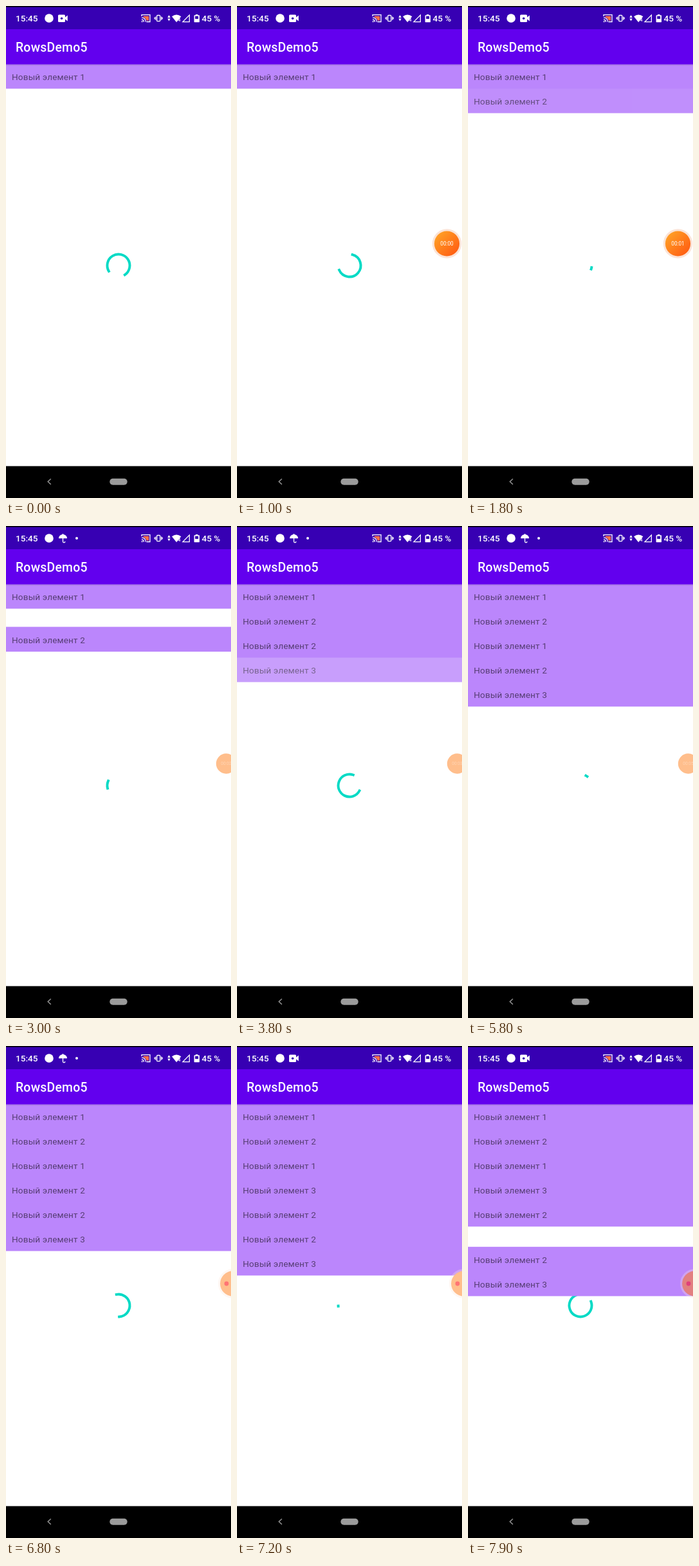
Recreate the animation shown at these times as an HTML page. Size 350 by 764 pixels, loop 8000 ms.

```html
<!DOCTYPE html>
<html lang="ru">
<head>
<meta charset="utf-8">
<title>RowsDemo5</title>
<style>
  html, body { margin: 0; width: 100%; height: 100%; overflow: hidden; background: #fff; }
  svg { display: block; width: 350px; height: 764px; font-family: Roboto, "Noto Sans", sans-serif; }
  .status { font-size: 13.6px; font-weight: 500; fill: #fff; }
  .title { font-size: 19.4px; font-weight: 500; letter-spacing: .0125em; fill: #fff; }
  .row rect { fill: #bb86fc; }
  .row text { font-size: 13.6px; letter-spacing: .01em; fill: #000; fill-opacity: .54; }
  .timer { font-size: 8.2px; fill: #fff; text-anchor: middle; }
  .line { fill: none; stroke: #fff; stroke-width: 1.3; }
</style>
</head>
<body>
<svg viewBox="0 0 350 764">
  <defs>
    <linearGradient id="orange" x1="0" y1="0" x2="1" y2="1">
      <stop offset=".1" stop-color="#ffa126"/><stop offset=".9" stop-color="#ff5c12"/>
    </linearGradient>
    <linearGradient id="shade" x1="0" y1="0" x2="0" y2="1">
      <stop offset="0" stop-color="#000" stop-opacity=".14"/><stop offset="1" stop-color="#000" stop-opacity="0"/>
    </linearGradient>
  </defs>
  <rect width="350" height="764" fill="#fff"/>
  <path id="arc" fill="none" stroke="#03dac5" stroke-width="3.9" stroke-linecap="square"/>
  <g id="rows"></g>

  <rect y="90.5" width="350" height="3" fill="url(#shade)"/>
  <rect y="36" width="350" height="54.6" fill="#6200ee"/>
  <rect width="350" height="36" fill="#3700b3"/>
  <rect width="350" height="1.6" fill="#000"/>
  <text class="title" x="15" y="71">RowsDemo5</text>

  <g class="status">
    <text x="15" y="24">15:45</text>
    <circle cx="67" cy="19" r="6.8"/>
    <g id="camera">
      <path d="M82.5 13.5h8q1.5 0 1.5 1.5v2.6l3.8-3v9l-3.8-3v2.9q0 1.5-1.5 1.5h-8q-1.5 0-1.5-1.5v-8.5q0-1.5 1.5-1.5z"/>
      <circle cx="86.6" cy="19.2" r="1.8" fill="#3700b3"/>
    </g>
    <g id="umbrella">
      <path d="M82 19.3a6.5 6.3 0 0 1 13 0z"/>
      <path class="line" d="M88.5 12v12q0 1.8 1.7 1.8t1.7-1.8"/>
      <circle cx="110" cy="19" r="2"/>
    </g>
    <path class="line" d="M211 16v-2.3h13v10.8h-5.5M211 18.2q6 0 6.4 6.4M211 21.2q3.2.2 3.4 3.4"/>
    <path d="M213.5 15.8h8.6v6.8h-3.4q-1.4-4.6-5.2-5.4z" fill="#ff7043"/>
    <circle cx="211.6" cy="24.2" r="1"/>
    <rect class="line" x="234.7" y="14.5" width="5" height="9.2" rx="1"/>
    <path class="line" d="M232.8 16.4v5.4M231.2 17.6v3M241.6 16.4v5.4M243.2 17.6v3"/>
    <path d="M251.3 18l2.2-4 2.2 4zM251.3 19.6l2.2 4 2.2-4z"/>
    <path d="M258 16.2q7.2-5.2 14.4 0l-7.2 9z"/>
    <text x="267.5" y="23.5" font-size="7">4</text>
    <path class="line" d="M285.3 14v10.6h-10.3z"/>
    <path d="M295 13h3.4v1.3h2q.6 0 .6.7v9.6q0 .7-.7.7h-7q-.7 0-.7-.7v-9.6q0-.7.6-.7h1.8z"/>
    <rect x="294.2" y="15.7" width="5" height="4.4" fill="#3700b3"/>
    <text x="304.5" y="24">45 %</text>
  </g>

  <g id="ball">
    <circle id="halo" r="22.7" fill="#fbe3d6"/>
    <circle id="disc" r="19.6"/>
    <text id="timer" class="timer" y="3"></text>
    <circle id="dot" cx="-9.7" r="3.4"/>
  </g>

  <rect y="714.5" width="350" height="49.5" fill="#000"/>
  <path d="M69.8 734.3l-4.6 4.3 4.6 4.3" fill="none" stroke="#8c8c8c" stroke-width="1.5"/>
  <rect x="161.3" y="733.7" width="27.4" height="10" rx="5" fill="#9b9b9b"/>
</svg>
<script>
const LOOP = 8000, ROW = 38, TOP = 90.4, MOVE = 250, FADE = 120;
const $ = id => document.getElementById(id);
const clamp = u => Math.min(1, Math.max(0, u));
const ramp = (t, from, length) => clamp((t - from) / length);
const ease = u => (1 - Math.cos(Math.PI * u)) / 2;
const show = (el, on) => el.setAttribute('visibility', on ? 'visible' : 'hidden');

// Insertions: label number, list index, time
const adds = [
  [1, 0, -1000], [2, 1, 1690], [2, 1, 2833], [3, 3, 3705],
  [1, 2, 4833], [2, 3, 5800], [3, 3, 6815], [1, 5, 7716]
];
// Each row reaches slightly upwards so that neighbours leave no seam
const rows = adds.map(([n]) => {
  const g = document.createElementNS('http://www.w3.org/2000/svg', 'g');
  g.setAttribute('class', 'row');
  g.innerHTML = `<rect y="-.6" width="350" height="${ROW + 0.6}"/><text x="9" y="24.7">Новый элемент ${n}</text>`;
  return $('rows').appendChild(g);
});

function drawRows(t) {
  adds.forEach(([, index, start], i) => {
    let slot = index, y = TOP + ROW * index;
    for (const [, at, time] of adds.slice(i + 1)) {
      if (time > t || at > slot) continue;
      slot++;
      y += ROW * ease(ramp(t, time, MOVE));
    }
    const delay = index === i ? 0 : MOVE;
    rows[i].setAttribute('transform', `translate(0 ${y})`);
    rows[i].setAttribute('opacity', ramp(t, start + delay, FADE));
  });
}

// Height at x of a cubic with the given x controls, flat at both ends, by bisection
function cubic(x, x0, x1, x2, x3) {
  let lo = 0, hi = 1;
  for (let i = 0; i < 24; i++) {
    const u = (lo + hi) / 2, v = 1 - u;
    if (v*v*v*x0 + 3*v*v*u*x1 + 3*v*u*u*x2 + u*u*u*x3 < x) lo = u; else hi = u;
  }
  return lo * lo * (3 - 2 * lo);
}

function drawSpinner(t) {
  const p = (0.537 + t / 1333) % 1;
  const tail = p < 0.5 ? 0 : cubic(p, 0.5, 0.7, 0.6, 1);
  const head = p > 0.5 ? 1 : cubic(p, 0, 0.2, 0.1, 0.5);
  const base = 187 + 720 * t / 4444 + 90 * p;
  const from = base + 270 * tail;
  const to = Math.max(base + 270 * head, from + 0.5);
  const point = deg => {
    const a = deg * Math.PI / 180;
    return `${175 + 17.5 * Math.sin(a)} ${403 - 17.5 * Math.cos(a)}`;
  };
  $('arc').setAttribute('d', `M${point(from)}A17.5 17.5 0 ${to - from > 180 ? 1 : 0} 1 ${point(to)}`);
}

function drawBall(t) {
  const dock = ease(ramp(t, 2300, 300)), recording = t >= 5900, late = t >= 7300;
  const x = recording ? 352.7 : 326.5 + 16 * dock;
  const scale = recording ? 1 : 1 - 0.2 * dock;
  $('ball').setAttribute('transform', `translate(${x} 369) scale(${scale})`);
  $('ball').setAttribute('opacity', ramp(t, 600, 200));
  $('halo').setAttribute('opacity', recording ? 0.3 : 1 - dock);
  $('disc').setAttribute('fill', late ? '#e28080' : dock === 1 ? '#ffbe8c' : 'url(#orange)');
  $('dot').setAttribute('fill', late ? '#e0407c' : '#ff7474');
  show($('dot'), recording);
  show($('timer'), !recording);
  $('timer').setAttribute('opacity', 1 - 0.65 * dock);
  $('timer').textContent = '00:0' + Math.max(0, Math.floor((t - 500) / 1000));
}

function frame() {
  const t = performance.now() % LOOP;
  const rain = t >= 2300 && t < 7000;
  show($('umbrella'), rain);
  show($('camera'), !rain);
  drawRows(t);
  drawSpinner(t);
  drawBall(t);
  requestAnimationFrame(frame);
}
frame();
</script>
</body>
</html>
```
